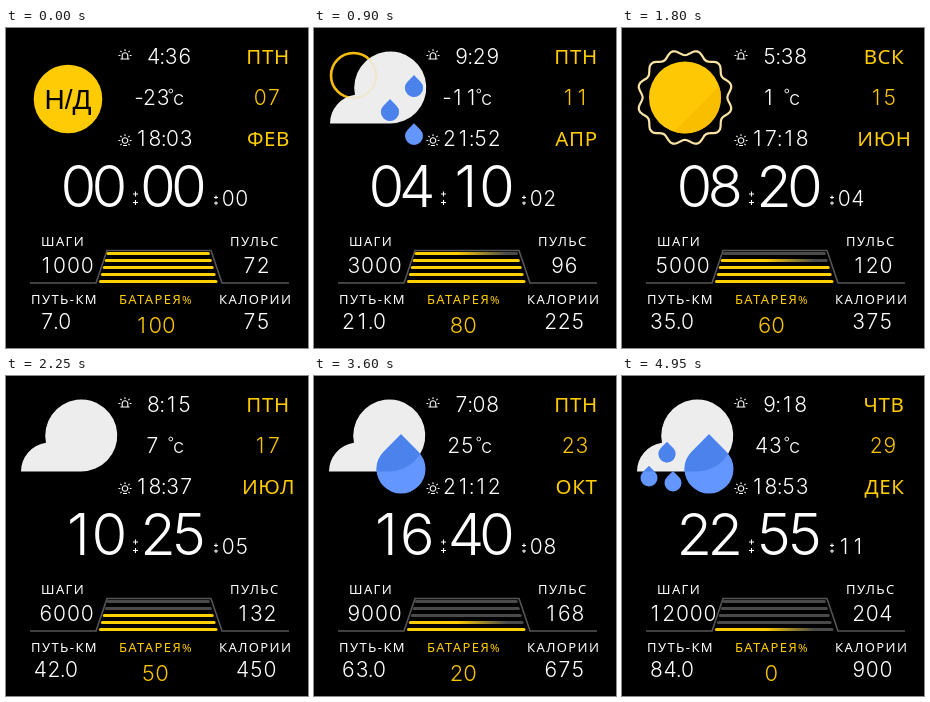
Animation, 302 px wide and 320 px high, one loop 5400 ms. Source, as an HTML page:

```html
<!DOCTYPE html>
<html lang="ru">
<head>
<meta charset="utf-8">
<title>Циферблат</title>
<style>
  html, body { margin: 0; width: 100%; height: 100%; overflow: hidden; background: #000; }
  svg { display: block; }
  .num { font-family: Inter, Roboto, sans-serif; font-weight: 300; text-anchor: middle; fill: #fff; }
  .label { font: 500 13px "Noto Sans", "Open Sans", sans-serif; letter-spacing: 1.4px; fill: #fff; }
  .date { font: 500 20.5px "Noto Sans", "Open Sans", sans-serif; letter-spacing: .6px; text-anchor: middle; }
  .na { font: 400 28px "Liberation Sans", Roboto, sans-serif; text-anchor: middle; fill: #000; }
  .label.gold, .date { fill: #fc0; }
  .num.gold { fill: #f8c400; }
  .tiny { fill: none; stroke: #fff; stroke-width: 1.1; }
</style>
</head>
<body>
<svg width="302" height="320" viewBox="0 0 302 320">
  <defs>
    <linearGradient id="fade" gradientUnits="userSpaceOnUse" x1="95" y1="0" x2="210" y2="0">
      <stop offset=".42" stop-color="#fc0"/>
      <stop offset=".85" stop-color="#4a4a4a"/>
    </linearGradient>
    <clipPath id="inCloud"><path id="clipShape"/></clipPath>
    <path id="rays" d="M0-6.300V-4.500M-4.600-4.600l1.200 1.200M4.600-4.600l-1.200 1.200M-6.500 0H-4.700M4.700 0H6.500"/>
  </defs>
  <rect width="302" height="320"/>

  <g class="tiny">
    <g transform="translate(119 27.5)">
      <use href="#rays"/>
      <path d="M-2.800 3V0a2.800 2.800 0 0 1 5.600 0V3M-4.500 3.500H4.500"/>
    </g>
    <g transform="translate(119 112.500)">
      <use href="#rays"/>
      <circle r="2.800"/>
      <path d="M-4.600 4.600l1.200-1.200M4.600 4.600l-1.200-1.200M-2 5H2"/>
    </g>
    <path d="M127 166H132M129.500 163.500V168.500M127 174.500H132M129.500 172V177"/>
    <path d="M208 169.500H212M210 167.500V171M208 175H212M210 173.500V177"/>
    <circle cx="164.800" cy="63" r="1.900" stroke-width=".9"/>
  </g>
  <text class="num" x="172.5" y="77" font-size="20">c</text>

  <text class="label" x="35" y="217.5">ШАГИ</text>
  <text class="label" x="224" y="218">ПУЛЬС</text>
  <text class="label" x="25" y="276">ПУТЬ-КМ</text>
  <text class="label gold" x="113" y="276">БАТАРЕЯ<tspan font-size="11.5">%</tspan></text>
  <text class="label" x="213" y="276">КАЛОРИИ</text>
  <path d="M24 255H90L101 222.500H205L216 255H283" fill="none" stroke="#555" stroke-width="1.6"/>

  <g id="face"></g>
</svg>
<script>
const STEP = 450, COUNT = 12;
const face = document.getElementById('face');
const clipShape = document.getElementById('clipShape');

const days = 'ПТН ВСК ПТН ВТР ВСК ПТН ВТР ВСК ПТН ВТР СБТ ЧТВ'.split(' ');
const months = 'ФЕВ МАР АПР МАЙ ИЮН ИЮЛ АВГ СЕН ОКТ НОЯ ДЕК ДЕК'.split(' ');
const rises = '4:36 6:12 9:29 7:21 5:38 8:15 4:32 6:47 7:08 7:44 5:26 9:18'.split(' ');
const sets = '18:03 19:40 21:52 20:16 17:18 18:37 17:25 20:54 21:12 19:14 17:49 18:53'.split(' ');

// drops and flakes: [x, y, radius]
const pair = [[99, 60, 9], [75, 84, 9], [99, 108, 9]];
const bigDrop = [87, 93, 24.5];
const leftFlake = [39, 97.5, 10.5], rightFlake = [94, 94.5, 12.5];
const skies = [
  { na: 1 },
  { ring: 1 },
  { ring: 1, drops: pair },
  { ring: 1, flakes: [rightFlake] },
  { sun: 1 },
  {},
  { drops: pair },
  { dy: 8, flakes: [rightFlake] },
  { drops: [bigDrop] },
  { dy: 8, flakes: [leftFlake, rightFlake] },
  { dy: 8, flakes: [leftFlake, [66, 101, 10.5], rightFlake] },
  { drops: [[45, 78, 8.5], [27, 102, 8.5], [51, 107, 8.5], bigDrop] }
];

const pad = n => String(n).padStart(2, '0');

// Digits sit in equal cells; punctuation takes less room.
function num(str, cx, y, { size = 21, pitch = 13.6, right, cls = '' } = {}) {
  const cells = [...str].map(c => c === ':' || c === '.' ? 4 : c === '-' ? 7.5 : pitch);
  const total = cells.reduce((a, b) => a + b, 0);
  let x = right ? right - total : cx - total / 2;
  const xs = cells.map(w => (x += w) - w / 2);
  return `<text class="num ${cls}" font-size="${size}" x="${xs.join(' ')}" y="${y}">${str}</text>`;
}

function cloudPath(dy) {
  const base = 95.5 + dy;
  return `M15 ${base}a29 29 0 0 1 25-28.7A36 36 0 1 1 75 ${base}Z`;
}

function dropPath([x, y, r]) {
  const k = r * Math.SQRT1_2;
  return `M${x} ${y - 2 * k}l${k} ${k}A${r} ${r} 0 1 1 ${x - k} ${y - k}Z`;
}

function flake([x, y, r]) {
  let arms = '';
  for (let a = 0; a < 360; a += 60) {
    arms += `<path transform="rotate(${a})" d="M0 0V${-r}M${-r * .3} ${-r * .85}L0 ${-r * .55}L${r * .3} ${-r * .85}"/>`;
  }
  return `<g transform="translate(${x} ${y}) rotate(8)" fill="none" stroke="#5b86e0" stroke-width="1.2">${arms}</g>`;
}

function wavyRing(cx, cy) {
  const pts = [];
  for (let d = 0; d < 360; d += 3) {
    const a = d * Math.PI / 180, r = 45 - 2.7 * Math.cos(12 * a);
    pts.push((cx + r * Math.cos(a)).toFixed(1) + ',' + (cy + r * Math.sin(a)).toFixed(1));
  }
  return `<polygon points="${pts.join(' ')}" fill="none" stroke="#f8e3a3" stroke-width="2.2"/>`;
}

function sky({ na, sun, ring, dy = 0, drops = [], flakes = [] }) {
  if (na) return '<circle cx="62" cy="71" r="34.3" fill="#ffcb05"/><text class="na" x="62" y="81">Н/Д</text>';
  if (sun) return wavyRing(63, 69.5) +
    '<circle cx="63" cy="69.5" r="36" fill="#ffc805"/>' +
    '<path d="M97 58A36 36 0 0 1 51.5 103.5Z" fill="#fabe00"/>';

  const shape = cloudPath(dy);
  clipShape.setAttribute('d', shape);
  const halo = opacity =>
    `<circle cx="38.5" cy="47.5" r="22.5" fill="none" stroke="#f7bd08" stroke-width="2.6" opacity="${opacity}"/>`;
  const cloud = `<path d="${shape}" fill="#ededed"/>`;
  const d = drops.map(dropPath).join('');
  const rain = d && `<path d="${d}" fill="#6496ff"/><path d="${d}" fill="#4c82ec" clip-path="url(#inCloud)"/>`;
  const body = (ring ? halo(1) + cloud + halo(.12) : cloud) + rain + flakes.map(flake).join('');
  return `<g transform="translate(${ring ? 1 : 0} 0)">${body}</g>`;
}

function bars(level) {
  const halves = level / 10 + 1;
  let out = '';
  for (let k = 0; k < 5; k++) {
    const left = halves - 2 * k, y = 253.5 - 7 * k, x = 94.5 + 1.9 * k;
    const paint = left >= 2 ? '#ffd000' : left === 1 ? 'url(#fade)' : '#4a4a4a';
    out += `<path d="M${x} ${y}H${304.5 - x}" stroke="${paint}" stroke-width="3" stroke-linecap="round"/>`;
  }
  return out;
}

function bigPair(n, cx) {
  return num(pad(n), cx, 179, { size: 58, pitch: 31 });
}

function draw(i) {
  const n = i + 1, level = Math.max(0, 100 - 10 * i);
  face.innerHTML = [
    sky(skies[i]),
    num(rises[i], 0, 35.5, { right: 185.5 }),
    num(String(6 * i - 23), 146.5, 77),
    num(sets[i], 0, 117.5, { right: 187 }),
    `<text class="date" x="262" y="35.5">${days[i]}</text>`,
    num(pad(7 + 2 * i), 261, 77, { cls: 'gold' }),
    `<text class="date" x="262.5" y="117.5">${months[i]}</text>`,
    bigPair(2 * i, 87.8),
    bigPair(5 * i, 167.5),
    num(pad(i), 229, 178),
    num(String(1000 * n), 60.5, 245, { pitch: 13.8 }),
    num(String(60 + 12 * n), 250.3, 245),
    num(7 * n + '.0', 50, 301),
    num(String(level), 149.3, 305, { size: 22, cls: 'gold' }),
    num(String(75 * n), 250.3, 301),
    bars(level)
  ].join('');
}

let shown = -1;
const start = performance.now();
function tick() {
  const i = Math.floor(Math.max(0, performance.now() - start) / STEP) % COUNT;
  if (i !== shown) draw(shown = i);
  requestAnimationFrame(tick);
}
tick();
</script>
</body>
</html>
```
